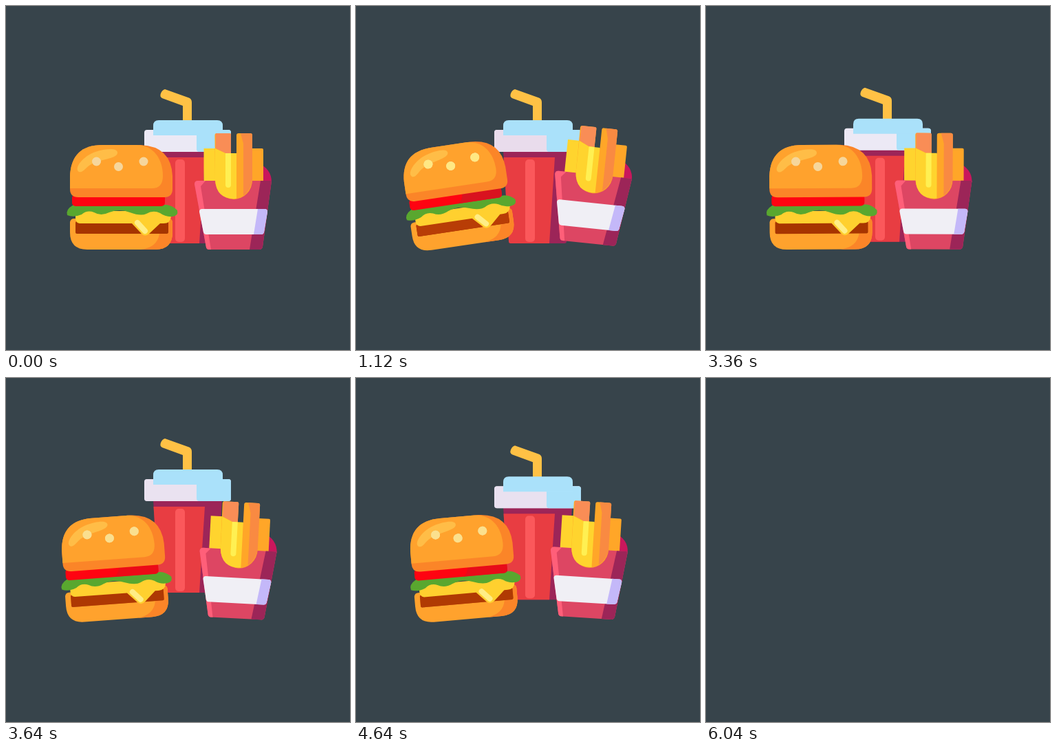
Animation of 500 by 500 pixels, one loop 6080 ms. Source, as an HTML page:

```html
<!DOCTYPE html>
<html lang="en">
<head>
<meta charset="utf-8">
<title>Fast food</title>
<style>
html, body { margin: 0; width: 100%; height: 100%; overflow: hidden; background: #37444b; }
svg { display: block; width: 100%; height: 100%; }
</style>
</head>
<body>
<svg viewBox="0 0 500 500">
  <g id="meal">
    <g id="drink">
      <path fill="#ffc145" d="M231 121L266 133.500Q270 135 270 140V167H257V145L227 134Q223 132 225 127T231 121Z"/>
      <path fill="#9c2558" d="M214 210H314L306 342Q306 345 303 345H225Q222 345 222 342Z"/>
      <path fill="#e83d42" d="M214.500 220H289L281 345H225Q222 345 222 342Z"/>
      <rect fill="#fb585b" x="246" y="223" width="14" height="120" rx="5"/>
      <rect fill="#ebe9f5" x="201" y="180" width="126" height="32" rx="4"/>
      <rect class="warm" fill="#e9dcec" x="201" y="180" width="126" height="32" rx="4"/>
      <path fill="#aae1fa" d="M277 180H323Q327 180 327 184V208Q327 212 323 212H281Q277 212 277 208Z"/>
      <path fill="#aae1fa" d="M214 188V174Q214 166 222 166H307Q315 166 315 174V188Z"/>
    </g>
    <g id="burger">
      <path fill="#ffa22d" d="M93 314Q94 309 99 309H236Q242 309 242 315V329Q242 354 217 354H118Q93 354 93 329Z"/>
      <path fill="#fb8528" d="M223 331H236V309Q242 309 242 315V329Q242 354 217 354H196Q220 351 223 331Z"/>
      <rect fill="#a63500" x="101" y="313" width="135" height="18" rx="2"/>
      <rect class="warm" fill="#b83d06" x="101" y="313" width="135" height="18" rx="2"/>
      <path fill="#ffd02f" d="M101 298H240V306Q239 316 229 316H224L208 331Q202 336 197 331L183 316H107Q101 315 101 308Z"/>
      <path stroke="#ffed85" stroke-width="8" stroke-linecap="round" d="M191 315L202 327"/>
      <path fill="#59a72f" d="M98 289H234Q242 290 249 297Q251 305 242 306Q232 307 224 301Q214 296 204 302Q196 306 180 300Q165 294 150 300Q138 306 128 300Q118 296 110 303Q98 308 89 304Q86 296 98 289Z"/>
      <rect fill="#ff0311" x="96" y="274" width="135" height="17" rx="5"/>
      <path class="warm" fill="#d9121f" d="M174 274H231V286Q231 291 226 291H166Q174 287 174 274Z"/>
      <path fill="#fb8528" d="M93 247Q95 202 140 202H196Q240 204 242 247V266Q242 278 230 278H105Q93 278 93 266Z"/>
      <path fill="#ffa22d" d="M93 265V247Q95 202 140 202H190C214 202 228 222 228 247Q228 265 212 265Z"/>
      <path fill="#ffbd47" d="M106 241C98 236 112 218 130 212C146 207 163 206 162 214C160 222 140 222 124 230C116 234 112 243 106 241Z"/>
      <g id="seeds" fill="#f6d69c">
        <circle cx="131.500" cy="226" r="6.500"/><circle cx="163.500" cy="233.500" r="6.500"/><circle cx="200" cy="226" r="6.500"/>
      </g>
      <use class="warm" href="#seeds"/>
      <g class="warm" fill="#ffe883">
        <circle cx="131.500" cy="226" r="6.500"/><circle cx="163.500" cy="233.500" r="6.500"/><circle cx="200" cy="226" r="6.500"/>
      </g>
    </g>
    <g id="fries">
      <path fill="#c9175c" d="M365 228Q386 236 386 256H365Z"/>
      <path fill="#ffd42e" d="M287.500 207H306V256H287.500Z"/>
      <path fill="#ffa628" d="M357 207H372Q374 207 374 209V256H357Z"/>
      <path fill="#dd4663" d="M274 259Q274 254 279 254H386L373 350Q372 354 368 354H295Q292 354 291 351Z"/>
      <path fill="#ff5f79" d="M274 259Q274 254 279 254H290L283 262L298 354H295Q292 354 291 351Z"/>
      <path fill="#9c2558" d="M370 254H386L373 350Q372 354 368 354H354Z"/>
      <path fill="#ffa628" d="M303.500 188Q303.500 185 306 185H325Q327 185 327 187V215H335V188Q335 185 338 185H355Q358 185 358 188V253A27 28 0 0 1 304 253Z"/>
      <path fill="#f98d56" d="M305 185H325Q327 185 327 187V214H319L305 207Z"/>
      <path fill="#ffd42e" d="M304 207L319 214H335V280Q306 282 304 253Z"/>
      <path fill="#fff052" d="M319 214H327V260Q327 264 323 264T319 260Z"/>
      <path fill="#f98a42" d="M341 185H355Q358 185 358 188V253Q356 268 345 276V200Z"/>
      <path fill="#f0eff5" d="M281 299Q281 295 285 295H376Q380 295 380 299L375 329Q374 332 371 332H291Q288 332 287 329Z"/>
      <path fill="#c4b8f9" d="M366 295H376Q380 295 380 299L375 329Q374 332 371 332H360Z"/>
    </g>
  </g>
</svg>
<script>
const LOOP = 6080, CYCLE = 2920;
const $ = id => document.getElementById(id);
const warm = document.querySelectorAll('.warm');
const ramp = (t, start, length) => Math.min(1, Math.max(0, (t - start) / length));
const hop = q => 1 - Math.abs(2 * q - 1);
const move = (id, value) => $(id).setAttribute('transform', value);

function draw(now) {
  const time = now % LOOP;
  const second = time >= CYCLE;
  const t = second ? time - CYCLE : time;
  const out = ramp(t, 420, 600), back = ramp(t, 1505, 530);
  const p = out - back;
  const lift = hop(out) * (second ? 33 : 30) + hop(back) * (second ? 28 : 25);

  move('drink', `translate(0 ${-lift})`);
  move('burger', `translate(${168.5 - 16.5 * p} ${299 - 4.4 * p}) rotate(${-8.5 * p}) scale(1 ${1 - 0.03 * p}) translate(-168.5 -299)`);
  move('fries', `translate(${330.5 + 11 * p} ${296 - 9 * p}) rotate(${6 * p}) translate(-330.5 -296)`);
  warm.forEach(el => el.setAttribute('opacity', p));
  $('meal').setAttribute('visibility', time < 6040 ? 'visible' : 'hidden');
}

const begin = performance.now();
function tick() {
  draw(performance.now() - begin);
  requestAnimationFrame(tick);
}
tick();
</script>
</body>
</html>
```
